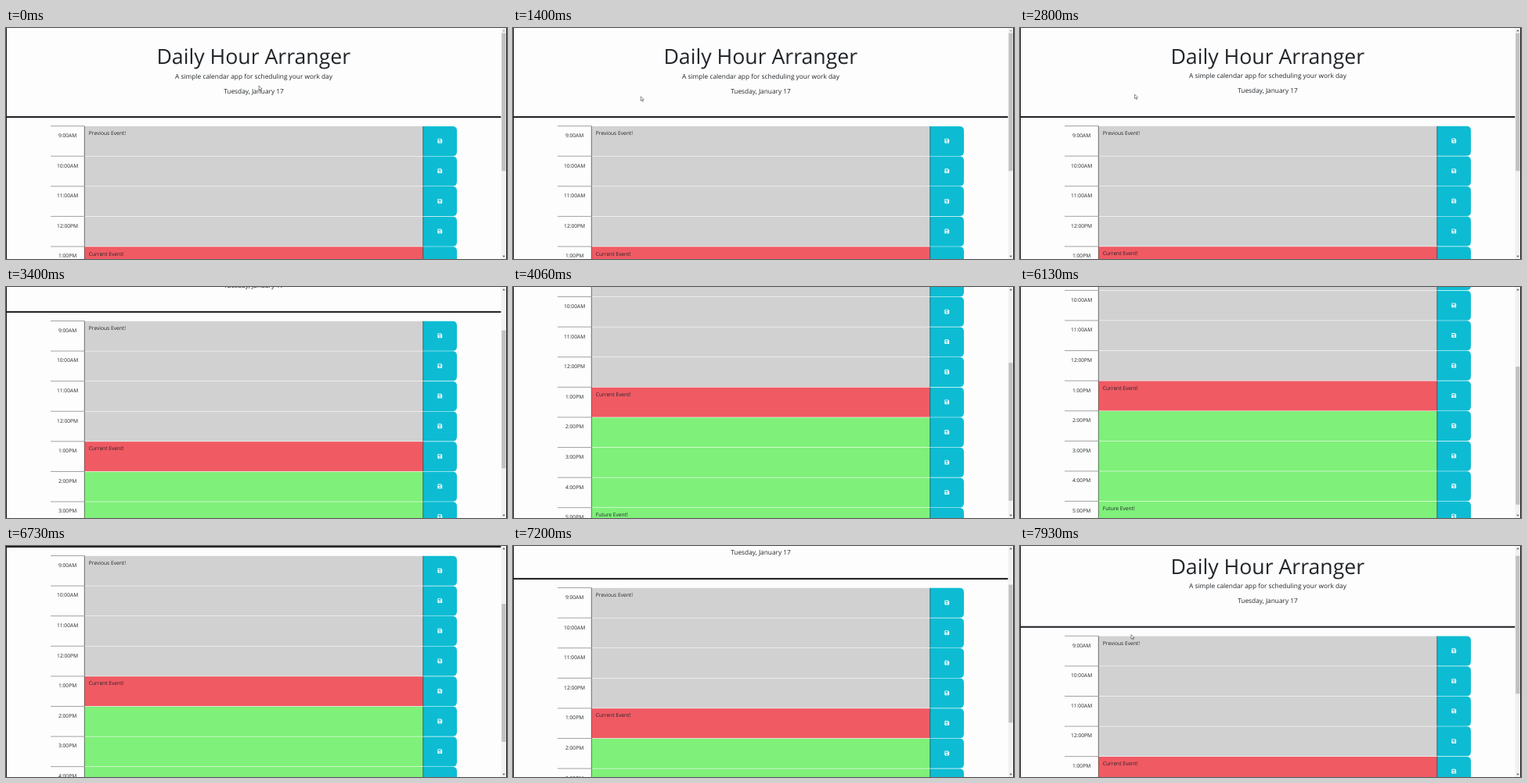
Animation, 640 px wide and 296 px high, one loop 8000 ms. Source, as an HTML page:

```html
<!DOCTYPE html>
<html lang="en">
<head>
<meta charset="utf-8">
<style>
  html, body { margin: 0; width: 100%; height: 100%; overflow: hidden; background: #fdfdfd; }
  svg { display: block; width: 640px; height: 296px; }
  text { font: 6.66px "Open Sans", "Noto Sans", sans-serif; fill: #212529; text-rendering: geometricPrecision; }
  .mid { text-anchor: middle; }
  .title { font-size: 26.66px; }
  .lead { font-size: 8.33px; }
</style>
</head>
<body>
<svg viewBox="0 0 640 296">
  <defs>
    <path id="save" fill="#fff" fill-rule="evenodd"
      d="M-2.3-2.9H1.5L2.9-1.5V2.3Q2.9 2.9 2.3 2.9H-2.3Q-2.9 2.9-2.9 2.3V-2.3Q-2.9-2.9-2.3-2.9ZM-2-2V-.4H1.2V-2ZM0 .3A.9.9 0 1 0 .01.3Z"/>
  </defs>
  <rect width="640" height="296" fill="#fdfdfd"/>
  <g id="page">
    <text class="mid title" x="316.3" y="46">Daily Hour Arranger</text>
    <text class="mid lead" x="316.5" y="64.5">A simple calendar app for scheduling your work day</text>
    <text class="mid lead" x="316.5" y="83.5">Tuesday, January 17</text>
    <rect y="113" width="632.5" height="2.1" fill="#252328"/>
  </g>
  <rect x="632.5" width="6.5" height="296" fill="#f1f1f1"/>
  <rect id="thumb" x="633.2" width="5.2" height="176.7" fill="#c1c1c1"/>
  <path id="up" d="M634.2 4.3h3.4l-1.7-2z"/>
  <path id="down" d="M634.2 291.7h3.4l-1.7 2z"/>
  <path d="M.5 0V296M639.5 0V296" stroke="#1c1c1c"/>
  <path id="cursor" d="M0 0V5.6L1.3 4.5 2.2 6.5 3.1 6.1 2.2 4.1H4Z" fill="#fff" stroke="#444" stroke-width=".6"/>
</svg>
<script>
const LOOP = 8000, ROWS_TOP = 125.6, PITCH = 38.6, MAX_SCROLL = 176.6;
const PAST = '#d1d1d1', PRESENT = '#f05a63', FUTURE = '#7ff07a';
const events = { 9: 'Previous Event!', 13: 'Current Event!', 17: 'Future Event!' };
const byId = id => document.getElementById(id);

function row(hour) {
  const y = ROWS_TOP + (hour - 9) * PITCH;
  const fill = hour < 13 ? PAST : hour > 13 ? FUTURE : PRESENT;
  const label = `${hour > 12 ? hour - 12 : hour}:00${hour < 12 ? 'AM' : 'PM'}`;
  return `<g transform="translate(0 ${y})">
    <path d="M57 0H100" stroke="#8c8c8c" stroke-width=".8"/>
    <text class="mid" x="78.6" y="14.4">${label}</text>
    <rect x="100" y=".3" width="433" height="38" fill="${fill}"/>
    <path d="M100.3 0V38.6" stroke="#555" stroke-width=".8"/>
    <text x="105.8" y="11.5">${events[hour] || ''}</text>
    <path d="M533 .3H570.5Q576 .3 576 5.8V32.8Q576 38.3 570.5 38.3H533Z" fill="#0dbcd3"/>
    <path d="M532.8 .3V38.3" stroke="#17545f" stroke-width=".8"/>
    <use href="#save" x="554.3" y="19"/>
  </g>`;
}
for (let hour = 9; hour <= 17; hour++) byId('page').insertAdjacentHTML('beforeend', row(hour));

// Keys are [time, value, slope per ms], joined by cubic Hermite curves.
function curve(keys, t) {
  if (t <= keys[0][0]) return keys[0][1];
  const i = keys.findIndex(key => key[0] > t);
  if (i < 0) return keys[keys.length - 1][1];
  const [t0, a, va = 0] = keys[i - 1], [t1, b, vb = 0] = keys[i];
  const d = t1 - t0, u = (t - t0) / d, w = 1 - u;
  return w * w * (1 + 2 * u) * a + u * u * (3 - 2 * u) * b + d * u * w * (w * va - u * vb);
}

const scrollKeys = [
  [2800, 0, .08], [3400, 82, .13], [4060, 151.6, .07], [4660, MAX_SCROLL],
  [5660, MAX_SCROLL], [6730, 113.2, -.08], [7930, 10.4, -.07], [8000, 5.5, -.07]
];
const cursorX = [[0, 323], [730, 165], [1260, 165], [2000, 146.5], [5660, 146.5], [6460, 142]];
const cursorY = [[0, 74], [730, 88], [1260, 88], [2000, 85], [5660, 85], [6460, 113.5]];

function draw(now) {
  const t = now % LOOP;
  const scroll = curve(scrollKeys, t);
  const x = curve(cursorX, t), y = curve(cursorY, t);
  byId('page').setAttribute('transform', `translate(0 ${-scroll})`);
  byId('thumb').setAttribute('y', 6.5 + scroll * .598);
  byId('up').setAttribute('fill', scroll > 0 ? '#505050' : '#a3a3a3');
  byId('down').setAttribute('fill', scroll < MAX_SCROLL ? '#505050' : '#a3a3a3');
  byId('cursor').setAttribute('transform', `translate(${x} ${y})`);
  // The arrow disappears over the text fields.
  byId('cursor').setAttribute('visibility', y < ROWS_TOP - scroll ? 'visible' : 'hidden');
}

const start = performance.now();
function tick() {
  draw(performance.now() - start);
  requestAnimationFrame(tick);
}
tick();
</script>
</body>
</html>
```
